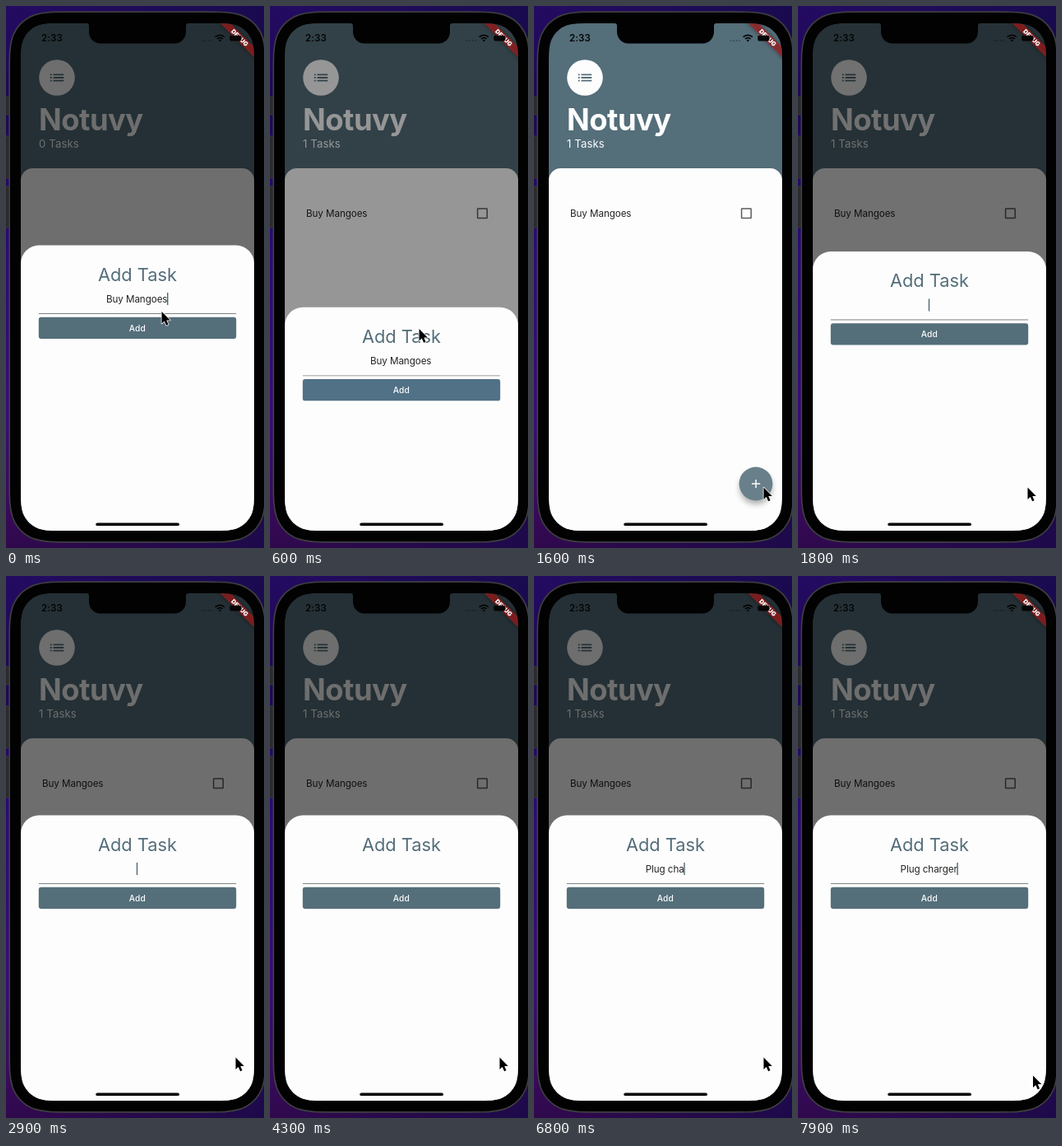
These frames come from a looping animation (314 by 658 pixels, 8 s). An HTML page:

```html
<!DOCTYPE html>
<html lang="en">
<head>
<meta charset="utf-8">
<title>Task list</title>
<style>
  html, body { margin: 0; width: 100%; height: 100%; overflow: hidden; background: #1d0a48; }
  svg { display: block; width: 100vw; height: 100vh; }
  text { font-family: Inter, Roboto, sans-serif; white-space: pre; }
  .mid { text-anchor: middle; }
  .body { font-size: 11.65px; letter-spacing: -.08px; fill: #242424; }
</style>
</head>
<body>
<svg viewBox="0 0 314 658">
  <defs>
    <linearGradient id="wall" x1="0" y1="0" x2="0" y2="1">
      <stop offset="0" stop-color="#240b62"/>
      <stop offset=".2" stop-color="#1c0854"/>
      <stop offset=".45" stop-color="#2c0a78"/>
      <stop offset=".75" stop-color="#3b0a7c"/>
      <stop offset=".9" stop-color="#3a0a60"/>
      <stop offset="1" stop-color="#30094c"/>
    </linearGradient>
    <linearGradient id="dusk">
      <stop offset="0" stop-color="#150a48" stop-opacity="0"/>
      <stop offset="1" stop-color="#150a48" stop-opacity=".7"/>
    </linearGradient>
    <clipPath id="screen"><path id="glass"/></clipPath>
    <filter id="soft" x="-50%" y="-100%" width="200%" height="300%"><feGaussianBlur stdDeviation="3.5"/></filter>
  </defs>

  <rect width="314" height="658" fill="url(#wall)"/>
  <rect width="314" height="658" fill="url(#dusk)"/>
  <g fill="#2b2b2d" stroke="#474749" stroke-width=".6">
    <rect x="-2" y="110" width="7" height="22"/>
    <rect x="-2" y="158" width="7" height="51"/>
    <rect x="-2" y="219" width="7" height="50"/>
  </g>
  <path id="shell" fill="#020202" stroke="#3e3e40" stroke-width="1.7"/>

  <g clip-path="url(#screen)">
    <rect x="18" y="21" width="284" height="616" fill="#546e7a"/>
    <circle cx="62" cy="87" r="21.8" fill="#fdfdfd"/>
    <path transform="translate(51.1 76.1) scale(.91)" fill="#546e7a"
      d="M3 7h2v2H3zM3 11h2v2H3zM3 15h2v2H3zM7 7h14v2H7zM7 11h14v2H7zM7 15h14v2H7z"/>
    <text x="40" y="151" font-size="36.4" font-weight="700" letter-spacing="-.5" fill="#fdfdfd">Notuvy</text>
    <text id="count" x="40" y="172" font-size="13.1" letter-spacing=".15" fill="#fdfdfd"></text>
    <path d="M18 637V211.5a14.5 14.5 0 0 1 14.5-14.5h255a14.5 14.5 0 0 1 14.5 14.5V637z" fill="#fdfdfd"/>
    <g id="task">
      <text class="body" x="44" y="256">Buy Mangoes</text>
      <rect x="252.6" y="246" width="11.6" height="11.6" rx=".6" fill="none" stroke="#5c5c5c" stroke-width="1.5"/>
    </g>
    <circle cx="270" cy="585" r="20" opacity=".3" filter="url(#soft)"/>
    <circle id="fab" cx="270" cy="580" r="20.4"/>
    <path d="M265 580h10.2M270.1 574.9v10.2" stroke="#fdfdfd" stroke-width="1.5"/>
    <rect id="dim" x="18" y="21" width="284" height="616"/>

    <g id="sheet">
      <path d="M18 360V22a22 22 0 0 1 22-22h240a22 22 0 0 1 22 22V360z" fill="#fdfdfd"/>
      <text class="mid" x="160" y="43" font-size="21.8" fill="#546e7a">Add Task</text>
      <text id="field" class="body mid" x="159.2" y="69.4"></text>
      <rect id="caret" y="57.5" width="1.4" height="15" fill="#4f6670"/>
      <path id="rule" d="M39.8 83H280.2"/>
      <rect id="add" x="39.8" y="87.3" width="240.4" height="26.2" rx="2.9"/>
      <text class="mid" x="159.8" y="104" font-size="10.2" font-weight="500" letter-spacing=".2" fill="#fdfdfd">Add</text>
    </g>

    <g transform="translate(302 21) rotate(45) scale(.728)">
      <rect x="-48" y="28" width="96" height="12" opacity=".4" filter="url(#soft)"/>
      <rect x="-48" y="28" width="96" height="12" fill="#b71c1c" fill-opacity=".63"/>
      <text class="mid" x="0" y="37.7" font-size="10.2" font-weight="900" fill="#fff">DEBUG</text>
    </g>
    <text x="43" y="43" font-size="11.5" font-weight="600" letter-spacing=".1" fill="#050505">2:33</text>
    <g opacity=".3">
      <circle cx="239.5" cy="42" r="1"/><circle cx="243" cy="42" r="1"/>
      <circle cx="246.5" cy="42" r="1"/><circle cx="250" cy="42" r="1"/>
    </g>
    <g fill="none" stroke="#050505" stroke-width="1.7">
      <path d="M254.7 37.6a8 8 0 0 1 11.2 0M256.9 40a4.8 4.8 0 0 1 6.8 0"/>
      <path d="M260.3 43.4l-1.7-1.8a2.4 2.4 0 0 1 3.4 0z" fill="#050505" stroke="none"/>
    </g>
    <rect x="272.3" y="35.8" width="14.2" height="6.8" rx="1.8" fill="#050505"/>
    <path d="M98 21q3 0 3 3v7.5a14 14 0 0 0 14 14h90a14 14 0 0 0 14-14v-7.5q0-3 3-3z" fill="#020202"/>
    <rect x="109.3" y="627.4" width="101.6" height="3.7" rx="1.85" fill="#020202"/>
  </g>

  <path id="mouse" d="M0 0V14.6l3.3-3.1 2.3 5.3 2.5-1.1-2.3-5.1h4.6z" fill="#000" stroke="#fff" stroke-width="1.5" stroke-linejoin="round" paint-order="stroke"/>
</svg>

<script>
const LOOP = 8000;
const CLOSE_AT = 487, CLOSE_MS = 200;
const OPEN_AT = 1600, OPEN_MS = 250;
const OPEN_Y = 290.5, TRAVEL = 347;
const TYPED = 'Plug charger';
const KEYS = [5100, 5380, 5600, 5860, 6080, 6320, 6500, 6680, 6880, 7080, 7280, 7560];
const MOUSE = [ // time, x, y
  [0, 189.5, 371], [280, 181.5, 392], [720, 181.5, 392], [1450, 279.5, 584.5],
  [7620, 279.5, 584.5], [7840, 286, 606.5]
];

const el = {};
document.querySelectorAll('svg [id]').forEach(n => el[n.id] = n);

const clamp = v => Math.min(1, Math.max(0, v));
const within = (t, a, b) => t >= a && t < b;
const set = (node, name, value) => node.setAttribute(name, value);

// Rounded rectangle with continuous-curvature corners.
function smoothRect(x, y, w, h, r) {
  const half = [[1.529, 0], [1.088, 0], [.868, 0], [.631, .075], [.373, .169]];
  const curve = half.concat(half.map(([a, b]) => [b, a]).reverse());
  const corner = (right, bottom) => {
    const pts = right === bottom ? curve.slice().reverse() : curve;
    const p = pts.map(([a, b]) =>
      `${right ? x + w - a * r : x + a * r} ${bottom ? y + h - b * r : y + b * r}`);
    return `${p[0]}C${p.slice(1, 4).join(' ')}C${p.slice(4, 6).join(' ')} ${p[6]}C${p.slice(7).join(' ')}`;
  };
  return 'M' + [corner(0, 0), corner(1, 0), corner(1, 1), corner(0, 1)].join('L') + 'Z';
}

function bezier(x1, y1, x2, y2) {
  const at = (s, a, b) => 3 * (1 - s) * (1 - s) * s * a + 3 * (1 - s) * s * s * b + s * s * s;
  return x => {
    if (x <= 0 || x >= 1) return clamp(x);
    let lo = 0, hi = 1;
    for (let i = 0; i < 24; i++) {
      const s = (lo + hi) / 2;
      if (at(s, x1, x2) < x) lo = s; else hi = s;
    }
    return at(lo, y1, y2);
  };
}
const slide = bezier(0, 0, 0.2, 1);
const ease = bezier(0.25, 0.1, 0.25, 1);
const glide = bezier(0.42, 0, 0.58, 1);

function mouseAt(t) {
  const i = MOUSE.findIndex(p => p[0] > t);
  if (i < 0) return MOUSE[MOUSE.length - 1].slice(1);
  const a = MOUSE[i - 1], b = MOUSE[i];
  const k = glide((t - a[0]) / (b[0] - a[0]));
  return [a[1] + (b[1] - a[1]) * k, a[2] + (b[2] - a[2]) * k];
}

// Solid after a key press, then a soft blink once a second.
function caretAlpha(age) {
  if (age < 375) return 1;
  const away = Math.abs((age + 250) % 1000 - 500);
  return clamp((375 - away) / 250);
}

function render(t) {
  const first = t < OPEN_AT;
  const shown = first ? clamp(1 - (t - CLOSE_AT) / CLOSE_MS) : clamp((t - OPEN_AT) / OPEN_MS);
  const added = t >= CLOSE_AT;
  set(el.sheet, 'transform', `translate(0 ${OPEN_Y + TRAVEL * (1 - slide(shown))})`);
  set(el.dim, 'opacity', 0.565 * ease(shown));

  el.count.textContent = (added ? 1 : 0) + ' Tasks';
  set(el.task, 'visibility', added ? 'visible' : 'hidden');

  const n = KEYS.filter(k => k <= t).length;
  el.field.textContent = first ? 'Buy Mangoes' : TYPED.slice(0, n);
  const focused = !first || !added;
  const width = el.field.textContent ? el.field.getComputedTextLength() : 0;
  set(el.caret, 'x', 158.8 + width / 2);
  const since = n ? KEYS[n - 1] : 1650;
  set(el.caret, 'opacity', first ? Number(focused) : caretAlpha(t - since));
  set(el.rule, 'stroke', focused ? '#7d8285' : '#a0a0a0');

  set(el.add, 'fill', within(t, 450, 750) ? '#507186' : '#546e7a');
  set(el.fab, 'fill', within(t, 1540, 1800) ? '#69808b' : '#546e7a');
  set(el.mouse, 'transform', `translate(${mouseAt(t).join(' ')})`);
}

set(el.glass, 'd', smoothRect(18, 21, 284, 616, 34.5));
set(el.shell, 'd', smoothRect(4.2, 7.2, 311.6, 643.6, 48.5));

const start = performance.now();
function tick() {
  render((performance.now() - start) % LOOP);
  requestAnimationFrame(tick);
}
tick();
</script>
</body>
</html>
```
